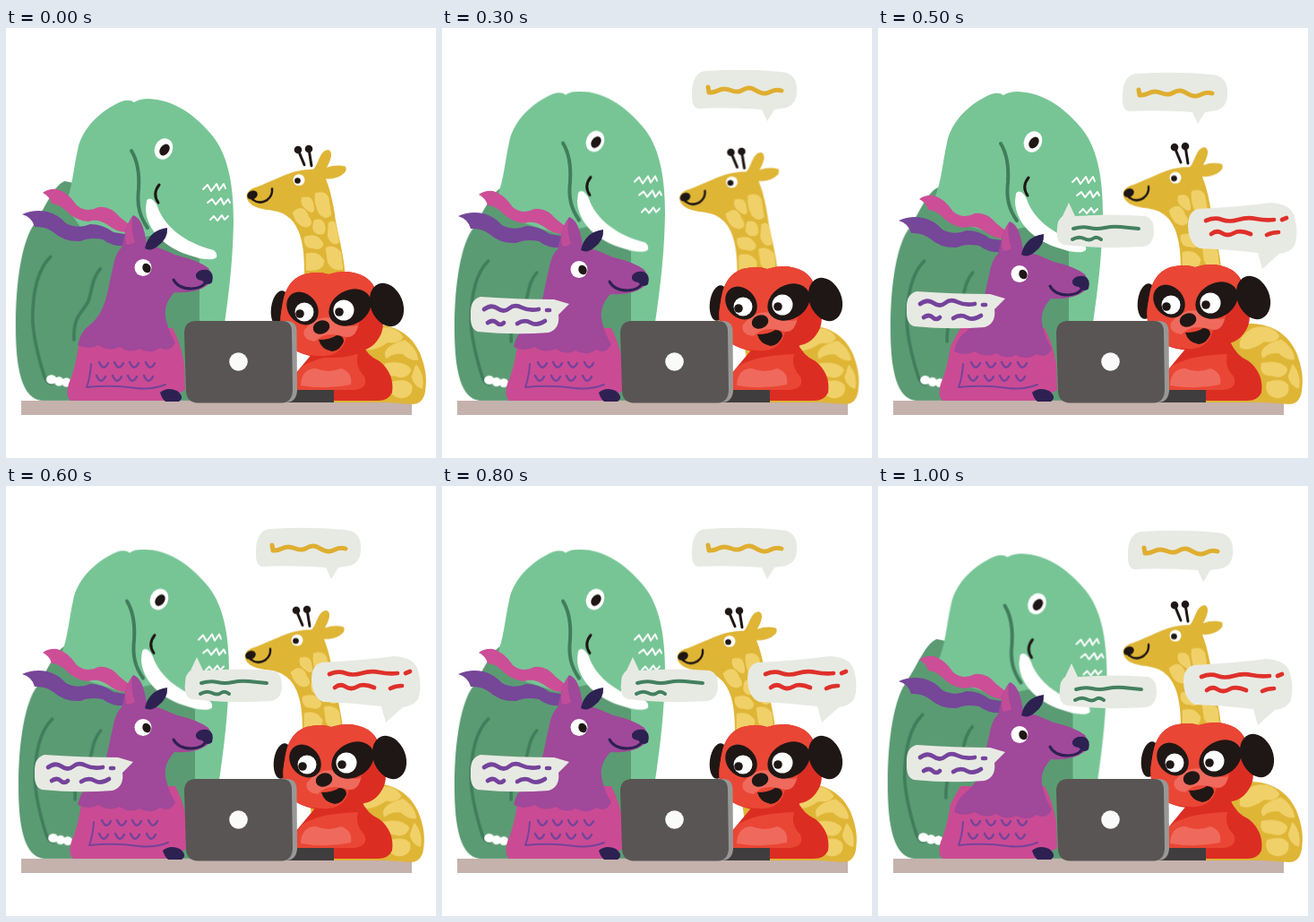
Write an HTML page that moves like this. It is 480 px wide and 480 px high and loops after 1100 ms.

```html
<!DOCTYPE html>
<html lang="en">
<head>
<meta charset="utf-8">
<title>Animals chatting at a laptop</title>
<style>
html, body { margin: 0; width: 100%; height: 100%; overflow: hidden; background: #fff; }
svg { display: block; width: 100vw; height: 100vh; }
.line { fill: none; stroke-linecap: round; stroke-linejoin: round; }
.ink { fill: #1f1715; }
.white { fill: #fff; }

/* Poses hold for 100 ms each, with hard cuts */
.move { animation: 1100ms step-end infinite; }
.trunk { animation-name: trunk; }
.back { animation-name: back; transform-origin: 120px 416px; }
.deer { animation-name: deer; }
.fleece { animation-name: fleece; }
.panda { animation-name: panda; }
.arms { animation-name: arms; }
.giraffe { animation-name: giraffe; transform-origin: 400px 418px; }
.say-y { animation-name: say-y; }
.say-g { animation-name: say-g; }
.say-p { animation-name: say-p; }
.say-r { animation-name: say-r; }

@keyframes trunk {
  0% { transform: translate(3px, 8px); }
  9.09% { transform: translate(2px, 4px); }
  18.18%, 45.45%, 63.63% { transform: none; }
  27.27%, 36.36%, 54.54%, 72.72% { transform: translate(-2px, -.5px); }
  81.81% { transform: translate(1px, 2px); }
  90.9% { transform: translate(4.5px, 4.5px); }
}
@keyframes back {
  0%, 90.9% { transform: scale(1.05, 1.03); }
  9.09% { transform: scale(1.02, 1.01); }
  18.18% { transform: none; }
  27.27% { transform: scale(1.02, 1); }
  81.81% { transform: scale(1.03, 1.01); }
}
@keyframes deer {
  0% { transform: translate(-5px, -7px); }
  9.09%, 18.18%, 45.45%, 63.63% { transform: none; }
  27.27%, 36.36%, 54.54%, 72.72% { transform: translate(-5px, -5px); }
  81.81% { transform: translate(-4px, -3px); }
  90.9% { transform: translate(0, 3px); }
}
@keyframes fleece {
  0%, 9.09%, 18.18%, 45.45%, 63.63%, 90.9% { transform: none; }
  27.27%, 36.36%, 54.54%, 72.72%, 81.81% { transform: translateX(3px); }
}
@keyframes panda {
  0% { transform: translate(6px, 8px); }
  9.09% { transform: translate(3px, 4px); }
  18.18%, 45.45%, 63.63% { transform: none; }
  27.27%, 36.36%, 54.54%, 72.72%, 81.81% { transform: translate(9px, 2px); }
  90.9% { transform: translate(4px, 0); }
}
@keyframes arms {
  0%, 27.27%, 36.36%, 54.54%, 72.72%, 81.81% { transform: translateX(3px); }
  9.09%, 18.18%, 45.45%, 63.63%, 90.9% { transform: none; }
}
@keyframes giraffe {
  0% { transform: translate(0, 0) scaleY(.99); }
  9.09% { transform: translate(2px, 0); }
  18.18% { transform: none; }
  27.27%, 36.36% { transform: translate(-3.5px, 0) scaleY(.98); }
  45.45%, 63.63%, 90.9% { transform: translate(5px, 0); }
  54.54% { transform: translate(-2px, 0) scaleY(.98); }
  72.72% { transform: translate(-6px, 0) scaleY(.975); }
  81.81% { transform: translate(-1px, 0) scaleY(.99); }
}
@keyframes say-y {
  0% { opacity: 0; }
  18.18%, 27.27%, 36.36%, 54.54%, 72.72%, 81.81% { opacity: 1; transform: none; }
  45.45%, 63.63% { opacity: 1; transform: translate(-6px, 3px); }
  90.9% { opacity: 1; transform: translate(0, 3px); }
}
@keyframes say-g {
  0% { opacity: 0; }
  36.36%, 54.54%, 72.72%, 81.81% { opacity: 1; transform: none; }
  45.45%, 63.63% { opacity: 1; transform: translate(0, 4px); }
  90.9% { opacity: 1; transform: translate(3px, 7px); }
}
@keyframes say-p {
  0% { opacity: 0; }
  27.27%, 36.36%, 54.54%, 72.72%, 81.81% { opacity: 1; transform: none; }
  45.45%, 63.63% { opacity: 1; transform: translate(0, -6px); }
  90.9% { opacity: 1; transform: translate(0, -11px); }
}
@keyframes say-r {
  0% { opacity: 0; }
  45.45%, 63.63% { opacity: 1; transform: translate(5px, 5px); }
  54.54%, 72.72%, 81.81% { opacity: 1; transform: none; }
  90.9% { opacity: 1; transform: translate(0, 3px); }
}
</style>
</head>
<body>
<svg viewBox="0 0 480 480">
  <rect x="17" y="416" width="436" height="16" fill="#c5b2ac"/>

  <!-- Elephant -->
  <g class="move back">
    <path fill="#5b9b73" d="M45 416C22 415 16 380 16 335C16 285 23 242 36 224C48 206 56 183 68 178L150 195L217 248V416Z"/>
    <g class="line" stroke="#417d5c" stroke-width="3.5">
      <path d="M53 260C38 275 34 300 34 328C35 352 42 375 46 388Q48 396 54 398"/>
      <path d="M106 273C97 283 97 298 93 309C86 321 77 325 78 350"/>
    </g>
    <g class="white">
      <ellipse cx="54" cy="393" rx="5.5" ry="5"/>
      <ellipse cx="62" cy="395" rx="5" ry="5"/>
      <ellipse cx="70" cy="396" rx="5" ry="5"/>
    </g>
  </g>
  <g class="move trunk">
    <path fill="#77c595" d="M63 190C71 172 72 150 77 128C82 103 104 83 126 74Q135 71 140 75Q146 71 156 71C187 72 211 92 228 113C247 137 251 174 251 208C250 255 246 290 237 350H213V250L166 222L130 230L80 214Z"/>
    <path class="line" stroke="#417d5c" stroke-width="4" d="M137 129C145 142 146 157 145 172C143 190 146 202 155 215"/>
    <path class="white" d="M154 185C157 180 162 183 166 191C173 212 194 231 229 240Q233 243 232 248Q226 253 206 247C176 239 153 218 153 193Z"/>
    <ellipse class="white" cx="173" cy="127" rx="10" ry="12" transform="rotate(24 173 127)"/>
    <ellipse class="ink" cx="174" cy="128" rx="5" ry="7" transform="rotate(35 174 128)"/>
    <path class="line" stroke="#1f1715" stroke-width="3" d="M168 167Q160 177 167 187"/>
    <g class="line" stroke="#fff" stroke-width="2">
      <path d="M217 172l5-5 4 7 6-8 3 7 5-7 2 5"/>
      <path d="M222 187l5-4 4 6 6-7 3 7 5-6 2 4"/>
      <path d="M225 206l4-4 4 5 5-6 3 5 4-4"/>
    </g>
  </g>

  <!-- Giraffe -->
  <g class="move giraffe">
    <path fill="#dfb536" d="M269 188C267 181 273 177 280 175C297 168 313 160 325 157Q334 155 343 155C349 150 350 133 360 133C366 136 362 146 358 153Q369 149 379 152Q382 157 374 162Q367 166 357 166C361 176 365 190 368 213C372 234 378 255 379 280L400 330C436 327 454 344 462 362C469 380 470 392 468 405C467 414 462 420 454 420L425 418H350L338 330Q333 290 333 268C333 242 329 219 314 208C301 198 281 204 271 192Z"/>
    <g fill="#f0d169" stroke="#f0d169" stroke-width="2.500" stroke-linejoin="round">
      <path d="M321 204Q332 194 337 209Q343 217 336 219Q326 220 321 204Z"/>
      <path d="M346 183Q355 180 359 187L362 206Q357 212 350 204Q345 194 346 183Z"/>
      <path d="M331 188Q341 185 342 195Q345 206 338 201Q329 196 331 188Z"/>
      <path d="M345 213Q354 211 355 220Q357 229 348 227Q341 224 345 213Z"/>
      <path d="M361 216Q366 212 368 220L371 237Q364 241 360 230Z"/>
      <path d="M334 232Q347 227 353 239Q352 246 343 243Q333 243 334 232Z"/>
      <path d="M358 244Q366 241 373 249L375 267Q364 269 360 259Z"/>
      <path d="M336 251Q348 248 354 258Q355 269 336 268Z"/>
      <path d="M414 336Q433 331 442 344Q439 351 426 349Q409 361 400 356Q398 345 414 336Z"/>
      <path d="M445 349Q457 357 459 369Q451 370 443 362Q431 361 425 367Q420 356 445 349Z"/>
      <path d="M424 375Q444 371 451 381Q447 392 434 387Q421 387 424 375Z"/>
      <path d="M458 377Q466 387 464 401Q456 398 454 389Z"/>
      <path d="M430 396Q446 391 452 399Q454 411 441 412Q427 410 430 396Z"/>
    </g>
    <path class="line" stroke="#1f1715" stroke-width="3" d="M333 150L326 133M341 151L338 132"/>
    <circle class="ink" cx="326" cy="133" r="4.3"/>
    <circle class="ink" cx="338" cy="132" r="4.3"/>
    <ellipse class="ink" cx="275" cy="184" rx="6" ry="4.7" transform="rotate(-25 275 184)"/>
    <path class="line" stroke="#1f1715" stroke-width="2.5" d="M275 189Q283 195 291 190Q298 185 297 177"/>
    <circle class="white" cx="327" cy="167" r="6.5"/>
    <circle class="ink" cx="325.5" cy="168" r="3.3"/>
  </g>

  <!-- Red panda -->
  <g class="move arms">
    <path fill="#dc2d23" d="M350 350H393Q400 366 414 372Q431 386 428 407Q424 416 412 416H315V392Z"/>
    <path fill="#ea4635" d="M318 394Q323 376 340 372Q352 366 390 364Q386 378 397 389Q402 402 386 404H318Z"/>
    <path fill="#ef6a5c" d="M326 399Q327 380 343 380Q357 386 371 380Q384 384 382 398Q355 404 326 399Z"/>
  </g>
  <g class="move panda">
    <ellipse class="ink" cx="300" cy="305" rx="10" ry="20" transform="rotate(8 300 305)"/>
    <path fill="#dc2d23" d="M303 298Q307 274 326 267Q343 263 354 267Q376 260 395 270Q408 278 411 300Q418 318 413 333Q405 350 391 352Q380 361 355 360Q322 360 308 345Q298 330 301 310Z"/>
    <path fill="#ea4635" d="M303 298Q307 274 326 267Q343 263 354 267Q376 260 395 270Q404 276 407 290Q392 300 388 322Q376 328 371 346Q362 360 345 358Q322 358 308 345Q298 330 301 310Z"/>
    <path fill="#ef6a5c" d="M327 329Q348 305 372 323Q388 328 388 320Q385 341 370 336Q350 330 339 342Q324 340 327 329Z"/>
    <ellipse class="ink" cx="419" cy="301" rx="18" ry="25" transform="rotate(-22 419 301)"/>
    <ellipse class="ink" cx="325" cy="305" rx="16" ry="20" transform="rotate(-40 325 305)"/>
    <ellipse class="ink" cx="378" cy="304" rx="25" ry="19" transform="rotate(-30 378 304)"/>
    <circle class="white" cx="327" cy="309" r="10.5"/>
    <circle class="white" cx="371" cy="307" r="11.5"/>
    <circle class="ink" cx="322" cy="311" r="4.8"/>
    <circle class="ink" cx="366" cy="309" r="4.8"/>
    <ellipse class="ink" cx="346" cy="326" rx="9.5" ry="7.5" transform="rotate(-20 346 326)"/>
    <path class="ink" d="M343 340Q356 340 363 335Q371 335 371 342Q367 352 358 353Q346 351 343 340Z"/>
  </g>

  <!-- Deer -->
  <g class="move fleece">
    <path fill="#ca4b94" d="M92 335L186 335Q195 352 199 375L200 404L180 416H72Q66 411 70 397Q77 382 81 355Z"/>
    <path class="line" stroke="#75439b" stroke-width="2" d="M95 375Q94 390 90 401Q118 398 145 402Q163 404 178 398"/>
    <path class="line" stroke="#75439b" stroke-width="2.5" d="M104 373q5 11 10 1m7-1q5 11 10 1m7-1q5 11 10 1m8-1q5 11 10 1M101 388q5 11 10 1m8-1q5 11 10 1m7-1q5 11 10 1m8-1q5 11 10 1"/>
    <path fill="#2d2152" d="M172 407Q180 400 191 405Q200 412 193 417H178Q174 414 172 407Z"/>
  </g>
  <g class="move deer">
    <path fill="#cc4e97" d="M46 191Q53 186 62 187Q74 190 84 205Q95 214 108 207Q121 205 132 218L142 226L139 235Q127 234 119 227Q107 219 97 223Q82 222 71 210Q63 203 56 203Q54 195 46 191Z"/>
    <path fill="#764699" d="M23 215Q36 209 51 212Q63 215 72 225Q85 232 99 226Q113 226 125 235L144 238L143 250Q124 252 113 243Q98 240 88 245Q70 246 58 235Q49 228 37 229Q34 218 23 215Z"/>
    <path fill="#a0489a" d="M137 240Q139 226 147 216Q158 219 162 248Q179 253 196 261Q219 266 231 275Q237 283 230 294Q216 304 193 302Q179 317 184 334Q187 347 194 358Q188 370 177 364Q166 372 154 365Q143 371 132 363Q120 369 108 361Q98 367 85 361Q88 346 98 339C118 323 118 299 124 276Q127 258 134 252Z"/>
    <path fill="#c14d98" d="M138 241Q138 228 146 218Q144 232 149 246Q143 250 139 248Z"/>
    <path fill="#2d2152" d="M160 253Q164 233 185 230Q186 242 175 250Q167 257 160 253Z"/>
    <path fill="#2d2152" d="M217 282Q220 276 230 277Q238 280 235 291Q230 296 224 289Q216 288 217 282Z"/>
    <path class="line" stroke="#2d2152" stroke-width="3" d="M192 288Q197 298 212 298Q227 297 229 288"/>
    <circle class="white" cx="158" cy="274.5" r="9.5"/>
    <ellipse class="ink" cx="162" cy="275" rx="4.5" ry="5.5" transform="rotate(-25 162 275)"/>
  </g>

  <!-- Laptop -->
  <path fill="#403d3e" d="M318 404H366V418H310Z"/>
  <path fill="#989896" d="M212 327H313Q324 327 324.500 338L325 405Q324 418 312 418H212Z"/>
  <path fill="#595554" d="M212 327H308Q319 327 319 339L320 405Q319 418 308 418.500H214Q202 418 201 406L199 341Q199 327 212 327Z"/>
  <circle cx="259.500" cy="372.500" r="10.300" fill="#fafafa"/>

  <!-- Speech bubbles -->
  <g class="move say-y">
    <path fill="#e7eae3" d="M294 48Q340 45 378 49Q396 50 396 68Q397 85 384 89L371 91L363 104L357 91Q317 88 286 90Q278 89 279 73Q279 50 294 48Z"/>
    <path class="line" stroke="#dfae30" stroke-width="5" d="M297 66l1 6C306 73 308 68 315 68S325 72 331 71S338 66 344 67S354 74 361 73S370 67 379 70"/>
  </g>
  <g class="move say-g">
    <path fill="#e7eae3" d="M206 206L213 191L220 206Q262 203 299 206Q308 209 308 222Q308 238 296 240Q250 243 208 238Q198 236 200 220Q200 210 206 206Z"/>
    <g class="line" stroke="#43805f" stroke-width="4">
      <path d="M218 220q10-3 18-1t17 0t18-1t20 2"/>
      <path d="M217 232q7-4 13-1t10 0t9 1"/>
    </g>
  </g>
  <g class="move say-p">
    <path fill="#e7eae3" d="M43 300Q85 303 125 303L142 308L130 320Q132 336 119 340Q80 343 40 339Q31 336 32 320Q31 303 43 300Z"/>
    <g class="line" stroke="#75439b" stroke-width="4.700">
      <path d="M47 314q8-6 15-1t13 0t14-1t19 2M117 315l3 0"/>
      <path d="M51 329q6-4 10 0t8 0M84 330q8-5 15-1t16-2"/>
    </g>
  </g>
  <g class="move say-r">
    <path fill="#e7eae3" d="M352 197Q395 195 433 190Q456 191 460 206Q465 224 460 238Q454 246 443 247L424 264L419 246Q387 242 354 241Q342 236 341 216Q341 200 352 197Z"/>
    <g class="line" stroke="#df302a" stroke-width="4.700">
      <path d="M361 210q10-4 18-1t18 0t20-1t20 1M446 209l5-2"/>
      <path d="M367 225q6-5 12-1t13 0t19 1M429 226q6-3 13-3"/>
    </g>
  </g>
</svg>
</body>
</html>
```
